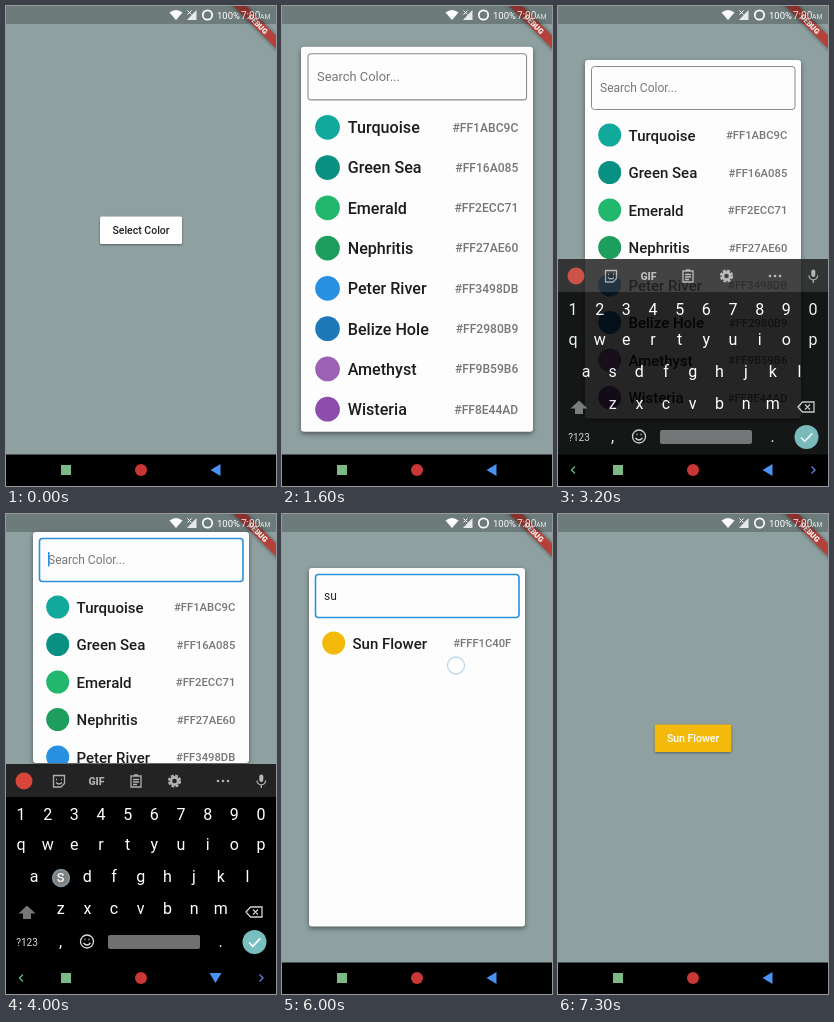
Recreate the animation shown at these times as an HTML page. Size 270 by 480 pixels, loop 9400 ms.

```html
<!DOCTYPE html>
<html lang="en">
<head>
<meta charset="utf-8">
<title>Color picker</title>
<style>
  html, body { margin: 0; width: 100%; height: 100%; overflow: hidden; background: #000; }
  svg { display: block; width: 270px; height: 480px; }
  text { font-family: Roboto, sans-serif; }
  .medium { font-weight: 500; }
  .mid { text-anchor: middle; }
  .end { text-anchor: end; }
  .key { font-size: 16px; fill: #fff; text-anchor: middle; }
  .word { font-size: 13.5px; fill: #c4c4c4; text-anchor: middle; }
  .line { fill: none; stroke: #b0b0b0; stroke-width: 1.3; }
  #card { filter: drop-shadow(0 2px 2.5px rgba(0, 0, 0, .45)); }
  #button { filter: drop-shadow(0 1px 1px rgba(0, 0, 0, .4)); }
</style>
</head>
<body>
<svg viewBox="0 0 270 480">
  <defs><clipPath id="cardClip"><rect id="clipRect" x="27" width="216" rx="3"/></clipPath></defs>
  <rect width="270" height="480" fill="#8fa0a0"/>

  <g id="button">
    <rect id="face" y="210.5" height="27.5" rx="1.5"/>
    <rect id="press" x="94" y="210.5" width="82" height="27.5" rx="1.5" fill="#000"/>
    <text id="label" class="medium mid" x="135" y="228" font-size="10.5"/>
  </g>

  <g id="dialog">
    <rect id="card" x="27" width="216" rx="3" fill="#fdfdfe"/>
    <g clip-path="url(#cardClip)"><g id="content">
      <rect id="field" x="33.5" y="6.5" width="203.5" height="43" rx="3" fill="none"/>
      <text id="query" x="42" y="32" font-size="12"/>
      <rect id="cursor" y="20" width="1.5" height="14.5" fill="#2b8fdc"/>
      <g id="rows"></g>
    </g></g>
  </g>

  <g id="banner" transform="translate(270 0) rotate(45)">
    <rect x="-40" y="21" width="80" height="9" fill="#b5403a" style="filter:drop-shadow(0 0 2px rgba(0,0,0,.5))"/>
    <text class="mid" y="28.3" font-size="7.6" font-weight="900" fill="#fff">DEBUG</text>
  </g>

  <rect width="270" height="18" fill="#000" opacity=".23"/>
  <g id="status" fill="#fff">
    <path d="M163.5 6.5Q170 1.5 176.500 6.500L170 14Z"/>
    <path d="M190.500 4V14H181Z" opacity=".85"/>
    <path d="M181.500 4.500l4 4m0-4l-4 4" stroke="#fff" fill="none"/>
    <circle cx="201.500" cy="9" r="4.700" fill="none" stroke="#fff" stroke-width="1.700"/>
    <text x="211" y="12.700" font-size="9.500">100%</text>
    <g opacity=".85"><text x="235" y="12.700" font-size="10">7:00</text>
    <text x="254" y="12.700" font-size="6.800">AM</text></g>
  </g>

  <g id="keyboard">
    <rect y="250" width="270" height="34" fill="#232323"/>
    <rect y="283" width="270" height="197"/>
    <circle cx="18" cy="267" r="8.500" fill="#d8453a"/>
    <g id="tools">
      <path class="line" d="M47.500 261.500h11v8l-3.500 3.500h-7.500zM50 265.500h1m4 0h1M50 268.500q3 3 6 0" stroke-width="1.600"/>
      <text class="mid" x="90.500" y="270.800" font-size="10.500" font-weight="900" fill="#b0b0b0">GIF</text>
      <path class="line" d="M125 262h10v11h-10zM128 261h4M127 265.500h6m-6 2.500h6m-6 2.500h4"/>
      <circle class="line" cx="168.500" cy="267" r="5.500" style="stroke-width:2.200;stroke-dasharray:2.900 1.420"/>
      <circle class="line" cx="168.500" cy="267" r="3.600" style="stroke-width:2.600"/>
      <path d="M212 267h.01m5 0h.01m5 0h.01" stroke="#b0b0b0" stroke-width="2.600" stroke-linecap="round"/>
    </g>
    <g id="words">
      <path d="M97 258v18M170 258v18" stroke="#3c3c3c"/>
      <text class="word" x="62" y="271.500"/>
      <text class="word" x="134" y="271.500"/>
      <text class="word" x="206" y="271.500"/>
    </g>
    <rect x="253.300" y="260.500" width="4" height="7.500" rx="2" fill="#b8b8b8"/>
    <path class="line" d="M251 266.500a4.300 4.300 0 0 0 8.600 0M255.300 271v3"/>
    <g id="keys"></g>
    <path d="M21 391.500l8.500 8H25v5.500h-8v-5.500h-4.500z" fill="#777"/>
    <path class="line" d="M244.500 393H256v10h-11.500l-4.500-5zM247 395.500l5 5m0-5l-5 5" style="stroke:#d0d0d0"/>
    <text class="mid" x="21" y="431.500" font-size="10" fill="#ddd">?123</text>
    <circle class="line" cx="81" cy="427.500" r="6.500" style="stroke:#ddd"/>
    <path class="line" d="M78.500 425.500h1m3 0h1M77.500 429q3.500 4 7 0" style="stroke:#ddd"/>
    <rect x="102" y="421" width="92" height="14" rx="2" fill="#707070"/>
    <circle cx="248.500" cy="428" r="12" fill="#78bfc0"/>
    <path d="M243 428.500l3.800 3.800 7.500-8" fill="none" stroke="#fff" stroke-width="1.700"/>
  </g>

  <rect y="448.500" width="270" height="31.500"/>
  <rect x="55" y="459" width="10" height="10" fill="#7cb987"/>
  <circle cx="135" cy="464" r="6" fill="#c93636"/>
  <path id="back" d="M204.500 464l10-6v12z" fill="#4b93f3"/>
  <g id="chevrons" fill="none" stroke-width="1.300">
    <path d="M17 460.500l-3.500 3.500 3.500 3.500" stroke="#6fb583"/>
    <path d="M253.500 460.500l3.500 3.500-3.500 3.500" stroke="#5f7fe0"/>
  </g>
  <circle id="touch" r="8.500" fill="#fff" fill-opacity=".5" stroke="#9cc3d2" stroke-opacity=".65" stroke-width="1.300"/>
</svg>

<script>
const LOOP = 9400, STEP = 100;
const $ = id => document.getElementById(id);
const set = (id, attrs) => {
  for (const name in attrs) $(id).setAttribute(name, attrs[name]);
};
const show = (id, on) => set(id, { visibility: on ? 'visible' : 'hidden' });

// Piecewise linear track: [time, value] pairs
const track = (t, ...points) => {
  if (t <= points[0][0]) return points[0][1];
  for (let i = 1; i < points.length; i++) {
    const [t0, v0] = points[i - 1], [t1, v1] = points[i];
    if (t <= t1) return v0 + (v1 - v0) * (t - t0) / (t1 - t0);
  }
  return points[points.length - 1][1];
};

const colors = [
  ['Turquoise', '#FF1ABC9C', '#10a99b'],
  ['Green Sea', '#FF16A085', '#089082'],
  ['Emerald', '#FF2ECC71', '#21b76d'],
  ['Nephritis', '#FF27AE60', '#1e9e5c'],
  ['Peter River', '#FF3498DB', '#2790e0'],
  ['Belize Hole', '#FF2980B9', '#1d79b9'],
  ['Amethyst', '#FF9B59B6', '#9c61b5'],
  ['Wisteria', '#FF8E44AD', '#8c4dab'],
  ['Sun Flower', '#FFF1C40F', '#f3ba0c']
];
$('rows').innerHTML = colors.map(([name, hex, fill]) => `<g>
  <circle cx="51.700" cy="0" r="11.500" fill="${fill}"/>
  <text class="medium" x="70.500" y="5.500" font-size="15" fill="#1c1c1c">${name}</text>
  <text class="medium end" x="229.300" y="4" font-size="11.250" fill="#767676">${hex}</text></g>`).join('');

const keyRow = (chars, x, y) => [...chars].map((c, i) =>
  `<text class="key" x="${x + i * 26.67}" y="${y}">${c}</text>`).join('');
$('keys').innerHTML = keyRow('1234567890', 15, 306) + keyRow('qwertyuiop', 15, 336) +
  keyRow('asdfghjkl', 28, 368) + keyRow('zxcvbnm', 54.700, 400) +
  keyRow(',', 54.500, 433) + keyRow('.', 214.500, 433);

const touches = [
  { from: 800, to: 1300, x: 140, y: 228 },
  { from: 2500, to: 2900, x: 150, y: 83.5 },
  { from: 4000, to: 4200, x: 55, y: 364 },
  { from: 4400, to: 4600, x: 175, y: 333 },
  { from: 5100, to: 5400, x: 208, y: 471 },
  { from: 6000, to: 6300, x: 174, y: 151.5 },
  { from: 6500, to: 6700, x: 160, y: 132 }
];

function drawButton(t) {
  const chosen = t >= 7100, width = chosen ? 76.5 : 82;
  set('face', { x: 135 - width / 2, width, fill: chosen ? '#f3ba0c' : '#fefefe' });
  set('press', { opacity: t < 1500 ? track(t, [700, 0], [1100, .12], [1200, .12], [1300, 0]) : 0 });
  $('label').textContent = chosen ? 'Sun Flower' : 'Select Color';
  set('label', { fill: chosen ? '#fff' : '#222' });
}

function drawDialog(t) {
  const scale = track(t, [1400, 0], [1500, .5], [1600, 1.074], [1700, 1.04], [1800, .99], [2000, 1],
    [6700, 1], [6800, 1.03], [6900, 1.1], [7000, 1.15], [7100, .55], [7200, 0]);
  show('dialog', scale > 0);
  if (!scale) return;
  set('dialog', { transform: `translate(135 233.25) scale(${scale}) translate(-135 -233.25)` });

  const lift = track(t, [3400, 0], [3500, .4], [3600, .75], [3700, .94], [3800, 1],
    [5500, 1], [5600, .6], [5700, .25], [5800, .06], [5900, 0]);
  const y = 54 - 36 * lift, height = 358.5 - 127.5 * lift;
  set('card', { y, height });
  set('clipRect', { y, height });
  set('content', { transform: `translate(0 ${y})` });

  const focused = t >= 3500;
  const typed = t < 4200 ? '' : t < 4500 ? 's' : 'su';
  set('field', { stroke: focused ? '#2b8fdc' : '#8a8a8a', 'stroke-width': focused ? 1.6 : 1 });
  $('query').textContent = typed || 'Search Color...';
  set('query', {
    fill: typed ? '#2a2a2a' : '#777',
    'text-decoration': typed && t < 5400 ? 'underline' : 'none'
  });
  set('cursor', { x: 42 + 6.4 * typed.length });
  show('cursor', focused && t < 4900 || t >= 5400 && t < 5900 || t >= 6100 && t < 6600);

  let slot = 0;
  [...$('rows').children].forEach((row, i) => {
    const match = colors[i][0].toLowerCase().includes(typed);
    row.setAttribute('display', match ? 'inline' : 'none');
    if (match) row.setAttribute('transform', `translate(0 ${75 + 37.5 * slot++})`);
  });
}

function drawKeyboard(t) {
  const shown = track(t, [3000, 0], [3100, .4], [3200, .85], [3300, 1],
    [5200, 1], [5300, .6], [5400, .2], [5500, 0]);
  set('keyboard', { opacity: shown, transform: `translate(0 ${20 * (1 - shown)})` });
  show('keyboard', shown > 0);
  show('chevrons', shown > .5);
  set('back', { transform: `rotate(${t >= 3300 && t < 5400 ? -90 : 0} 209.500 464)` });

  const suggesting = t >= 4200;
  set('tools', { display: suggesting ? 'none' : 'inline' });
  set('words', { display: suggesting ? 'inline' : 'none' });
  const words = t < 4500 ? ['s', 'so', 'see'] : ['su', 'sure', 'sun'];
  document.querySelectorAll('.word').forEach((el, i) => { el.textContent = words[i]; });
}

function drawTouch(t) {
  const touch = touches.find(p => t >= p.from && t < p.to);
  show('touch', touch);
  if (touch) set('touch', { cx: touch.x, cy: touch.y });
}

function render(t) {
  drawButton(t);
  drawDialog(t);
  drawKeyboard(t);
  drawTouch(t);
}

const start = performance.now();
function tick() {
  const t = (performance.now() - start) % LOOP;
  render(Math.floor(t / STEP) * STEP);
  requestAnimationFrame(tick);
}
tick();
</script>
</body>
</html>
```
